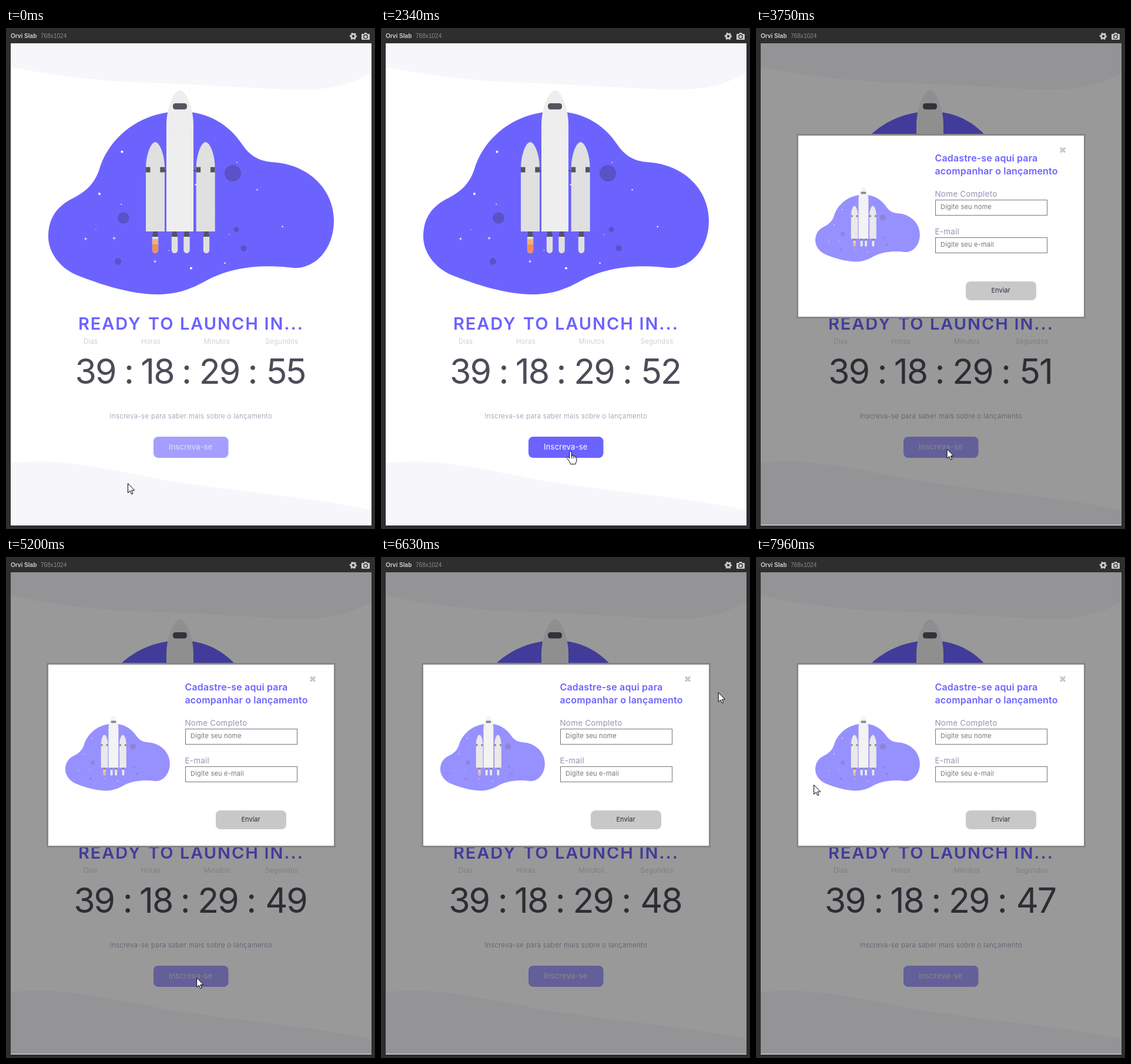
An HTML page for the animation above (8 s loop, 628 by 852 pixels).

```html
<!DOCTYPE html>
<html lang="pt">
<head>
<meta charset="utf-8">
<title>Ready to launch</title>
<style>
  html, body { margin: 0; width: 100%; height: 100%; overflow: hidden; background: #2e2e2e; }
  svg { display: block; width: 100%; height: 100%; font-family: Inter, sans-serif; }
  .bar { font: 10.1px "Liberation Sans", Arial, sans-serif; }
  .title { font-size: 29px; font-weight: 600; letter-spacing: 1.9px; fill: #6c63ff; }
  .small { font-size: 11.5px; letter-spacing: .24px; font-weight: 300; }
  .subtitle { font-size: 11.5px; letter-spacing: .35px; font-weight: 300; fill: #8f92ad; }
  .digits { font-size: 59px; letter-spacing: -2px; fill: #4c4b58; text-anchor: middle; }
  .heading { font-size: 16px; font-weight: 600; letter-spacing: .15px; fill: #6c63ff; }
  .label { font-size: 13.5px; letter-spacing: .2px; fill: #9793b4; }
  .hint { font-size: 11px; letter-spacing: .2px; fill: #757575; }
</style>
</head>
<body>
<svg viewBox="0 0 628 852">
  <rect width="628" height="852" fill="#2e2e2e"/>
  <g class="bar">
    <text x="8" y="17" font-weight="bold" fill="#cacaca">Orvi Slab</text>
    <text x="59" y="17" fill="#8a8a8a">768x1024</text>
  </g>
  <g fill="none" stroke="#c9c9c9">
    <circle cx="591" cy="14" r="3.6" stroke-width="3"/>
    <circle cx="591" cy="14" r="5.3" stroke-width="2" stroke-dasharray="2.775" stroke-dashoffset="1.4"/>
  </g>
  <path d="M606 10H609L610.500 8H613.500L615 10H618Q619 10 619 11V19Q619 20 618 20H606Q605 20 605 19V11Q605 10 606 10Z" fill="#c9c9c9"/>
  <circle cx="612" cy="14.700" r="3.200" fill="#c9c9c9" stroke="#2e2e2e" stroke-width="1.300"/>

  <rect x="8" y="26" width="614" height="820" rx="1" fill="#fff"/>
  <g fill="#f6f6fb">
    <path d="M8 26H622V76C575 103 530 107 470 104C400 101 330 96 250 93C150 90 90 82 8 66Z"/>
    <path d="M8 740C80 732 140 744 220 759C260 767 285 772 310 775C420 791 530 800 622 820V846H8Z"/>
  </g>

  <g id="scene">
    <path fill="#6c63ff" d="M72 355C72 322 88 302 115 289C138 277 150 264 158 243C176 180 235 142 296 142C345 142 380 165 402 198C415 217 430 226 452 228C514 231 558 274 558 328C558 372 530 409 490 408C455 404 395 400 340 430C310 447 285 453 258 453C215 453 165 438 120 420C90 407 72 380 72 355Z"/>
    <g fill="#5a52c6">
      <circle cx="386" cy="247" r="14"/><circle cx="200" cy="323" r="9.800"/><circle cx="190.500" cy="397" r="5.700"/>
      <circle cx="392" cy="342.500" r="4.600"/><circle cx="404.500" cy="374.500" r="5.200"/>
    </g>
    <g id="stars" fill="#fff"></g>
    <path d="M197.500 210.500h0M159 282h0M315 408.500h0" stroke="#fff" stroke-width="4.200" stroke-linecap="round"/>
    <path d="M133 358.500h5m-2.500-2.500v5M181.500 357.500h5m-2.500-2.500v5M251 397h5m-2.500-2.500v5" stroke="#fff" stroke-width=".9"/>
    <path d="M269 242.500H324" stroke="#55536e" stroke-width="2.500"/>
    <g id="engine">
      <path d="M248.800 355h10.400v22.800a5.200 5.200 0 0 1-10.400 0z" fill="#e0e0e0"/>
      <path d="M250.500 346h7l1.500 9h-10z" fill="#54535f"/>
    </g>
    <use href="#engine" x="33"/><use href="#engine" x="53.500"/><use href="#engine" x="87"/>
    <path d="M249 359H259V378A5 5 0 0 1 249 378Z" fill="#ed8f5b"/>
    <path d="M249 359H259V368H249Z" fill="#f0b07c"/>
    <g id="booster">
      <path d="M238 346V240C238 214 247 194 254 194C261 194 270 214 270 240V346Z" fill="#e0e0e0"/>
      <path d="M238 236.500H245.500V245.500H238ZM262.300 236.500H270V245.500H262.300Z" fill="#54535f"/>
    </g>
    <use href="#booster" x="85.700"/>
    <path d="M273 346V165C273 135 286 106 296 106C306 106 319 135 319 165V346Z" fill="#eee"/>
    <path d="M273 173.500H319" stroke="#e9e9ea"/>
    <rect x="284" y="128" width="24" height="10.500" rx="4.500" fill="#535361"/>
  </g>

  <g class="title">
    <text x="123" y="513">READY</text><text x="242" y="513">TO</text>
    <text x="296" y="513">LAUNCH</text><text x="439.500" y="513">IN...</text>
  </g>
  <g class="small" fill="#bac5ca">
    <text x="132" y="537">Dias</text><text x="230" y="537">Horas</text>
    <text x="336.500" y="537">Minutos</text><text x="441.500" y="537">Segundos</text>
  </g>
  <g class="digits">
    <g id="fixed">
      <text x="152" y="605">39</text><text x="208.500" y="605">:</text>
      <text x="257.500" y="605">18</text><text x="306.500" y="605">:</text>
      <text x="363" y="605">29</text><text x="419" y="605">:</text>
    </g>
    <text id="seconds" x="476.500" y="605">55</text>
  </g>
  <text class="subtitle" x="176.500" y="664">Inscreva-se para saber mais sobre o lançamento</text>
  <rect id="button" x="251" y="695" width="127.500" height="36" rx="8"/>
  <text id="buttonText" x="277" y="717" font-size="13" letter-spacing=".2">Inscreva-se</text>

  <g id="modal">
    <rect x="8" y="26" width="614" height="819" opacity=".4"/>
    <rect x="70.500" y="181.500" width="489" height="311" fill="#fff" stroke="#878787" stroke-width="3"/>
    <use href="#scene" transform="translate(74.600 231.600) scale(.366)" opacity=".7"/>
    <path d="M518 203.500L526 211.500M526 203.500L518 211.500" stroke="#c8c8c8" stroke-width="3.200"/>
    <g class="heading">
      <text x="304.500" y="227">Cadastre-se aqui para</text>
      <text x="304.500" y="249">acompanhar o lançamento</text>
    </g>
    <g class="label"><text x="304.500" y="287">Nome Completo</text><text x="304.500" y="351">E-mail</text></g>
    <g fill="#fff" stroke="#767676">
      <rect x="305.500" y="292.500" width="190" height="26"/><rect x="305.500" y="356.500" width="190" height="26"/>
    </g>
    <g class="hint"><text x="314" y="308">Digite seu nome</text><text x="314" y="372">Digite seu e-mail</text></g>
    <rect x="357" y="431" width="120" height="32" rx="8" fill="#c8c8c8"/>
    <text x="400.500" y="450" font-size="11" fill="#2f2e41">Enviar</text>
  </g>

  <g id="cursor" fill="#fff" stroke="#000" stroke-linejoin="round">
    <path id="arrow" d="M.5 .5V16.500L4.200 13L6.700 18.700L9 17.700L6.600 12.200H11.700Z"/>
    <path id="hand" d="M-2 12V2a1.800 1.800 0 0 1 3.600 0V8c0-1 3-1 3 .5c.5-1 3-.8 3 .8c1-.6 2.600 0 2.600 1.500V15c0 3-1.500 4-2 7H0C-1 18-4 15-6 12c-1-2 1-3 2.500-1.500zM1.600 8V12M4.600 8.500V12M7.600 9.500V12"/>
  </g>
  <circle id="click" cx="324" cy="715" r="12" fill="#e8d800" opacity=".6"/>
</svg>
<script>
const $ = id => document.getElementById(id);
const show = (id, on) => $(id).setAttribute('visibility', on ? 'visible' : 'hidden');
const LOOP = 8000, CLICK = 3600, OPEN = 3750;

// Small stars on a golden-angle spiral squashed into the cloud.
$('stars').innerHTML = Array.from({ length: 13 }, (_, i) => {
  const angle = i * 2.4, reach = Math.sqrt((i + .5) / 13);
  const x = 315 + 205 * reach * Math.cos(angle), y = 310 + 100 * reach * Math.sin(angle);
  return `<circle cx="${x}" cy="${y}" r="${.7 + i % 3 * .25}"/>`;
}).join('');

// Turning points of the pointer: time, x, y.
const route = [
  [700, 207, 774], [1430, 292, 769], [2410, 325, 716], [5800, 324, 715],
  [6480, 596, 270], [6630, 574, 230], [7470, 322, 168], [7820, 88, 325], [7960, 98, 387]
];

function pointerAt(t) {
  const next = route.findIndex(point => point[0] > t);
  if (next < 1) return route.at(next).slice(1);
  const [t0, x0, y0] = route[next - 1], [t1, x1, y1] = route[next];
  const k = (t - t0) / (t1 - t0);
  return [x0 + (x1 - x0) * k, y0 + (y1 - y0) * k];
}

const fullWidth = $('seconds').getComputedTextLength();

function draw(now) {
  const t = now % LOOP;
  $('seconds').textContent = 55 - Math.floor((t + 800) / 1000);
  // The clock is centred as a whole, so narrow seconds pull the rest to the right.
  const shift = (fullWidth - $('seconds').getComputedTextLength()) / 2;
  $('fixed').setAttribute('transform', `translate(${shift} 0)`);

  const [x, y] = pointerAt(t);
  const hover = t < OPEN && y < 731;
  $('cursor').setAttribute('transform', `translate(${x} ${y})`);
  show('arrow', !hover);
  show('hand', hover);
  $('button').setAttribute('fill', hover ? '#6c63ff' : '#a59eff');
  $('buttonText').setAttribute('fill', hover ? '#fff' : '#e4e0ec');
  show('click', t >= CLICK && t < OPEN);
  show('modal', t >= OPEN);
  requestAnimationFrame(draw);
}
requestAnimationFrame(draw);
</script>
</body>
</html>
```
